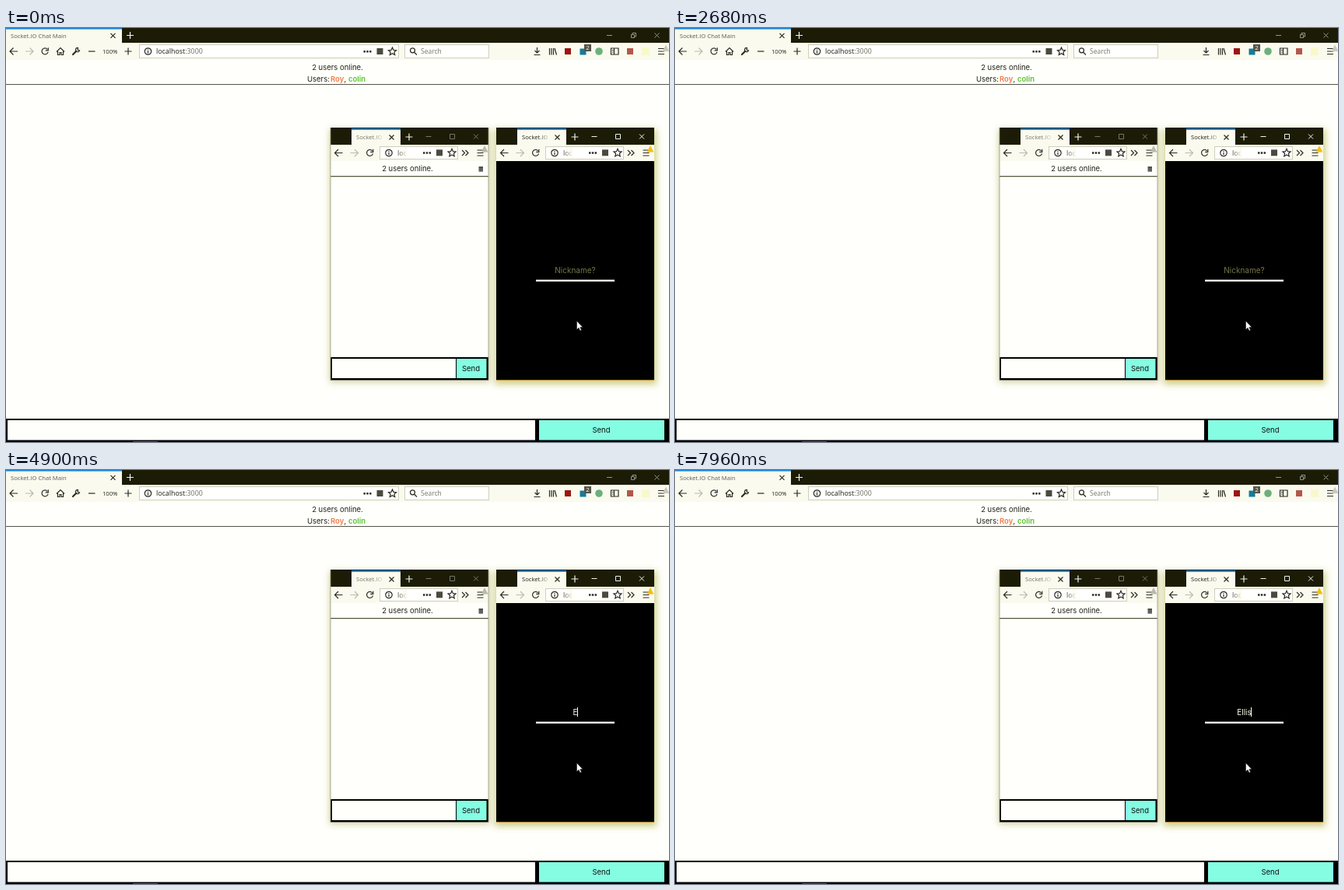
Write an HTML page that moves like this. It is 852 px wide and 532 px high and loops after 8 s.

```html
<!DOCTYPE html>
<html lang="en">
<head>
<meta charset="utf-8">
<title>Chat</title>
<style>
html, body { margin: 0; width: 852px; height: 532px; overflow: hidden; background: #fffffb; }
svg { display: block; }
text { white-space: pre; }
.ui { font-family: "Open Sans", "Noto Sans", sans-serif; font-size: 7.65px; }
.page { font-family: Inter, Roboto, sans-serif; font-size: 9.5px; }
.mid { text-anchor: middle; }
.line { fill: none; stroke: #2b2b22; stroke-width: 1.2; }
.field { fill: #fffffd; stroke: #cfcfbd; }
.bar { fill: #1b1b06; }
.tools { fill: #fafaef; }
.send { fill: #85fde3; }
</style>
</head>
<body>
<svg width="852" height="532" viewBox="0 0 852 532">
  <defs>
    <path id="back" class="line" d="M5 0H-5M-.5-4.5L-5 0-.5 4.5"/>
    <path id="reload" class="line" d="M3.2-2.6A4 4 0 1 0 4 .8M4.3-4.8v3.6H.7"/>
    <g id="info" class="line" stroke-width="1"><circle r="4.2"/><path d="M0-.8V2.4M0-2.6v1"/></g>
    <path id="dots" fill="#2b2b22" d="M-5-1h2.4v2.4h-2.4zM-1.2-1h2.4v2.4h-2.4zM2.6-1H5v2.4H2.6z"/>
    <rect id="mark" x="-4" y="-4" width="8" height="8"/>
    <path id="star" class="line" stroke-width="1" d="M0-5L1.5-1.6 5-1.3 2.4 1 3.2 4.6 0 2.7-3.2 4.6-2.4 1-5-1.3-1.5-1.6Z"/>
    <path id="menu" class="line" d="M-4-3.5H4M-4 0H4M-4 3.5H4"/>
    <path id="cross" d="M-3-3L3 3M3-3L-3 3"/>
    <path id="plus" d="M-4.5 0H4.5M0-4.5V4.5"/>
    <path id="warn" d="M0-4.5L4.5 4H-4.5Z"/>
    <g id="page-icons">
      <use href="#dots"/>
      <use href="#mark" x="16" fill="#4a4a40"/>
      <use href="#star" x="32"/>
    </g>
    <g id="nav">
      <use href="#back"/>
      <use href="#back" transform="translate(20)scale(-1 1)" opacity=".3"/>
      <use href="#reload" x="40"/>
    </g>
    <linearGradient id="fade">
      <stop offset="0" stop-color="#fafaef" stop-opacity="0"/>
      <stop offset="1" stop-color="#fafaef"/>
    </linearGradient>
    <filter id="soft" x="-20%" y="-20%" width="140%" height="140%"><feGaussianBlur stdDeviation="4"/></filter>

    <!-- chrome of a small window; fill and color are inherited -->
    <g id="chrome">
      <rect class="bar" x="417" y="128" width="203" height="22"/>
      <rect class="tools" x="444" y="129" width="63" height="21"/>
      <rect x="444" y="129" width="63" height="2" fill="#1b83d8"/>
      <text class="ui" x="450" y="143.3">Socket.IO</text>
      <rect x="472" y="134" width="15" height="13" fill="url(#fade)"/>
      <use href="#cross" x="495.5" y="140.5" stroke="#2b2b22" stroke-width="1.2"/>
      <use href="#plus" x="518" y="140" stroke="#f4f4e8" stroke-width="1.2"/>
      <g fill="none" stroke="currentColor">
        <path d="M539.5 139.5h7M570.5 136.5h6v6h-6z"/>
        <use href="#cross" x="604" y="139.5"/>
      </g>
      <rect class="tools" x="417" y="150" width="203" height="21"/>
      <use href="#nav" x="427.5" y="160.5"/>
      <rect class="field" x="480.5" y="152.5" width="100" height="16"/>
      <use href="#info" x="492" y="160.5"/>
      <text class="ui" x="503" y="163.6" style="font-size:8.9px" fill="#44443a">loc</text>
      <rect x="504" y="154" width="11" height="13" fill="url(#fade)"/>
      <use href="#page-icons" x="541" y="160.3"/>
      <path class="line" d="M586 157l3.5 3.5-3.5 3.5M590.5 157l3.5 3.5-3.5 3.5"/>
      <use href="#menu" x="609.5" y="160.5"/>
    </g>
  </defs>

  <rect width="852" height="532" fill="#fffffb"/>

  <!-- main window chrome -->
  <rect class="bar" width="852" height="19"/>
  <rect class="tools" width="149" height="19"/>
  <rect width="149" height="1.6" fill="#1b83d8"/>
  <text class="ui" x="6" y="12.8" fill="#5c5c50">Socket.IO Chat Main</text>
  <use href="#cross" x="137.5" y="9.8" stroke="#2b2b22" stroke-width="1.2"/>
  <use href="#plus" x="159.5" y="9.5" stroke="#f4f4e8" stroke-width="1.2"/>
  <g fill="none" stroke="#96968a">
    <path d="M772 9.5h7M803.5 8.5h4v4h-4zM805 8V6.500h4.500v4.500h-2"/>
    <use href="#cross" x="836.500" y="9.500"/>
  </g>
  <rect class="tools" y="19" width="852" height="22"/>
  <use href="#nav" x="10" y="30"/>
  <path class="line" d="M65 30.500L70 25.500l5 5M66.500 30v4.500h2.500v-3h2v3h2.500V30"/>
  <path class="line" stroke-linecap="round" d="M86 34l4-4" style="stroke-width:2.200"/>
  <path class="line" d="M92.500 25.500a2.600 2.600 0 1 0 2 3.500l-2.300-.6z"/>
  <path class="line" d="M106 30h8.500"/>
  <text class="ui" x="124" y="32.900" fill="#22221a">100%</text>
  <use href="#plus" x="157" y="30" stroke="#2b2b22" stroke-width="1.200"/>
  <rect class="field" x="171.500" y="21.500" width="333" height="17"/>
  <use href="#info" x="182.500" y="30"/>
  <text class="ui" x="193" y="33.300" style="font-size:8.900px" fill="#1c1c14">localhost<tspan fill="#6e6e60">:3000</tspan></text>
  <use href="#page-icons" x="464.500" y="30"/>
  <rect class="field" x="512.500" y="21.500" width="108" height="17"/>
  <path class="line" d="M524.500 31l3.500 3.500M525.500 28.800a3 3 0 1 1-6 0 3 3 0 0 1 6 0z"/>
  <text class="ui" x="533" y="33.300" style="font-size:8.500px" fill="#77776a">Search</text>
  <path class="line" d="M682.500 25v6.500M679.500 29l3 3 3-3M678.500 34.500h8"/>
  <path class="line" d="M698.500 26v8.500M701 26v8.500M703.500 26v8.500M705 26l2.500 8.500"/>
  <use href="#mark" x="722" y="30" fill="#9c1512"/>
  <use href="#mark" x="741.500" y="30.500" fill="#137c9c"/>
  <rect x="743" y="21" width="9" height="9" fill="#55554a"/>
  <text class="ui mid" x="747.500" y="28.200" fill="#fff">2</text>
  <circle cx="762" cy="30" r="4.800" fill="#6bb07a"/>
  <path class="line" d="M777.500 26h9.500v8h-9.500zM781.500 26v8M779 28.500h1.500M779 31h1.500"/>
  <use href="#mark" x="802" y="30" fill="#b5564a"/>
  <rect x="817" y="25" width="10" height="10" fill="#f8f8cc"/>
  <use href="#menu" x="842" y="30"/>
  <use href="#warn" x="848" y="26" fill="#c9c9c0"/>

  <!-- main page -->
  <g class="page" fill="#22221a">
    <text class="mid" x="426" y="53.800">2 users online.</text>
    <text x="387" y="69">Users:</text>
    <text x="417" y="69" font-weight="600" fill="#f27a45">Roy</text>
    <text x="434.500" y="69">,</text>
    <text x="440" y="69" font-weight="600" fill="#55c42c">colin</text>
  </g>
  <path d="M0 72.500H852" stroke="#55554a"/>
  <rect y="502" width="852" height="30"/>
  <rect x="2" y="504" width="678" height="25.500" fill="#fffffb"/>
  <rect class="send" x="685" y="504" width="161" height="25.500"/>
  <rect x="163" y="531" width="32" height="1" fill="#55554a"/>
  <text class="page mid" x="765" y="520" fill="#111">Send</text>

  <!-- left small window -->
  <rect x="416" y="130" width="206" height="325" fill="#a9a955" opacity=".55" filter="url(#soft)"/>
  <rect x="417" y="128" width="203" height="324.500" fill="#fffffb"/>
  <use href="#chrome" fill="#77776a" color="#77776a"/>
  <use href="#warn" x="615" y="155.500" fill="#b9b9ae"/>
  <text class="page mid" x="516" y="184.300" fill="#22221a">2 users online.</text>
  <path d="M607.500 179h5.500M607.500 181.200h5.500M607.500 183.400h5.500" stroke="#111" stroke-width="1.500"/>
  <path d="M417 190.700H620" stroke="#55553c" stroke-width="1.300"/>
  <rect x="417" y="423" width="203" height="29.500"/>
  <rect x="419" y="425" width="159" height="25" fill="#fffffb"/>
  <rect class="send" x="579" y="425" width="38.500" height="25"/>
  <text class="page mid" x="597.500" y="440.800" fill="#111">Send</text>
  <path d="M417 128V452.500M620 128V452.500" stroke="#99997a" stroke-width=".8"/>

  <!-- right small window -->
  <rect x="628" y="130" width="208" height="328" fill="#b5b550" opacity=".65" filter="url(#soft)"/>
  <rect x="630" y="128" width="203" height="324.500"/>
  <use href="#chrome" x="213" fill="#22221a" color="#f4f4e8"/>
  <use href="#warn" x="828" y="155.500" fill="#f5be12"/>
  <path d="M630 452.500H833" stroke="#c98f2e" stroke-width=".8"/>
  <text id="nick" class="page mid" x="731.500" y="314.500"></text>
  <rect id="caret" y="305" width="1" height="12" fill="#fffff0"/>
  <rect x="681" y="323.500" width="101" height="2.200" fill="#fffffb"/>
  <path d="M733.500 376.500v11l2.600-2.300 1.700 3.800 1.700-.8-1.700-3.600h3.300z" fill="#fff" stroke="#111" stroke-width=".5"/>
</svg>
<script>
const LOOP = 8000, NAME = "Ellis";
// time, typed letters, caret shown
const steps = [
  [0, 0, 0], [720, 0, 1], [2220, 0, 0], [3760, 0, 1], [4880, 1, 1],
  [5600, 2, 1], [6180, 3, 1], [6560, 4, 1], [6720, 4, 0], [7700, 5, 1]
];
const nick = document.getElementById("nick");
const caret = document.getElementById("caret");
const start = performance.now();
let shown;

function show(step) {
  const [, typed, caretOn] = step;
  nick.textContent = typed ? NAME.slice(0, typed) : "Nickname?";
  nick.setAttribute("fill", typed ? "#fffff0" : "#76764a");
  nick.style.fontSize = "10px";
  const half = typed ? nick.getComputedTextLength() / 2 : 0;
  caret.setAttribute("x", Math.round(731 + half));
  caret.setAttribute("opacity", caretOn);
}

function frame() {
  const t = Math.max(0, performance.now() - start) % LOOP;
  const step = steps.filter(s => s[0] <= t).pop();
  if (step !== shown) show(shown = step);
  requestAnimationFrame(frame);
}
frame();
</script>
</body>
</html>
```
